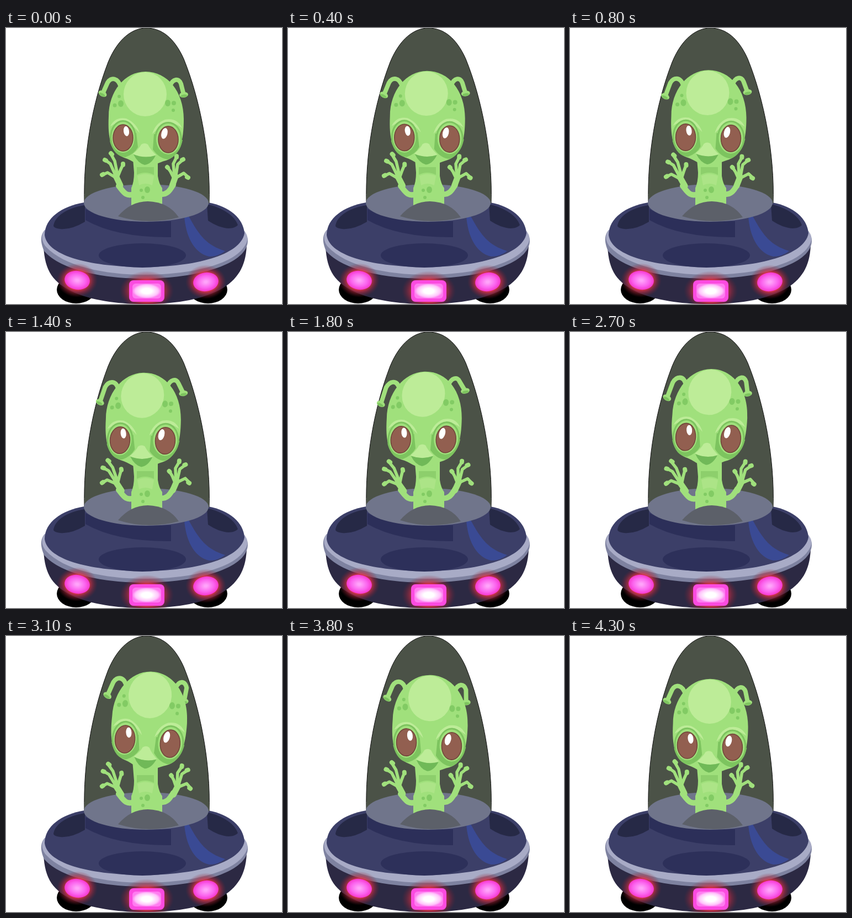
These frames come from a looping animation (500 by 500 pixels, 4.4 s). An HTML page:

```html
<!DOCTYPE html>
<html lang="en">
<head>
<meta charset="utf-8">
<title>Alien in a saucer</title>
<style>
  html, body { margin: 0; width: 100%; height: 100%; overflow: hidden; background: #fff; }
  svg { display: block; width: 100vw; height: 100vh; }
  .skin { fill: #a0e07c; }
  .light { fill: #bdec98; }
  .shade { fill: #7dc45f; }
  .spot { fill: #82cb64; }
  .limb { fill: none; stroke: #a0e07c; stroke-linecap: round; stroke-linejoin: round; }
</style>
</head>
<body>
<svg viewBox="0 0 500 500">
  <defs>
    <radialGradient id="glow">
      <stop offset=".5" stop-color="#ff3a50" stop-opacity=".95"/>
      <stop offset=".7" stop-color="#c02c40" stop-opacity=".6"/>
      <stop offset="1" stop-color="#7a2030" stop-opacity="0"/>
    </radialGradient>
    <radialGradient id="lamp">
      <stop offset=".1" stop-color="#ffa4fa"/>
      <stop offset=".65" stop-color="#fb63ee"/>
      <stop offset="1" stop-color="#f639cf"/>
    </radialGradient>
    <radialGradient id="beam">
      <stop offset=".35" stop-color="#fff"/>
      <stop offset=".8" stop-color="#ffc4fb"/>
      <stop offset="1" stop-color="#ff7cf0"/>
    </radialGradient>
  </defs>

  <!-- dome and seat -->
  <path fill="#4b5247" stroke="#111" d="M142 318C140 230 155 140 185 62C203 18 230 0 254 0C282 0 305 18 322 56C352 130 371 230 368 318Z"/>

  <!-- hull -->
  <ellipse cx="127" cy="474" rx="35" ry="25" fill="#000"/>
  <ellipse cx="366" cy="474" rx="35" ry="25" fill="#000"/>
  <path fill="#2c2943" d="M68 395C70 440 85 462 125 480C165 496 210 500 250 500C300 500 350 494 388 474C420 456 434 432 436 395Z"/>
  <path fill="#7e82a0" d="M70 366C60 378 64 392 69 404C100 440 180 454 250 454C330 454 415 435 434 400C441 388 438 376 432 368Z"/>
  <path fill="#a8abc6" d="M70 366C62 378 66 388 72 396C105 432 180 447 250 447C330 447 412 430 433 394C440 384 438 376 432 368Z"/>
  <path fill="#3c3f68" d="M142 316C100 323 70 345 70 375C75 415 160 433 250 433C340 433 425 412 432 372C430 345 405 323 366 316Z"/>
  <path fill="#262946" d="M86 359C88 341 110 326 143 321V351Q118 366 98 364Q88 363 86 359ZM364 319C394 326 415 341 420 357C408 369 384 361 366 349Z"/>
  <path fill="#2c2f59" d="M144 328Q190 352 299 350V379Q200 380 144 348Z"/>
  <ellipse cx="247" cy="412" rx="79" ry="22" fill="#2d305a"/>
  <path fill="#3a4a94" d="M323 340C325 375 340 408 368 414Q385 414 397 404C364 394 350 376 331 341Z"/>
  <path fill="#4b5247" d="M142 300H368V318H142Z"/>
  <ellipse cx="254" cy="317" rx="113" ry="34" fill="#70758b"/>

  <g id="lights">
    <ellipse cx="129" cy="457" rx="37" ry="31" fill="url(#glow)"/>
    <ellipse cx="129" cy="457" rx="23" ry="17" fill="url(#lamp)" transform="rotate(8 129 457)"/>
    <ellipse cx="362" cy="460" rx="37" ry="31" fill="url(#glow)"/>
    <ellipse cx="362" cy="460" rx="23" ry="17" fill="url(#lamp)" transform="rotate(-8 362 460)"/>
    <ellipse cx="255" cy="476" rx="49" ry="36" fill="url(#glow)"/>
    <rect x="223" y="457" width="64" height="39" rx="8" fill="#fb4be0"/>
    <rect x="229" y="463" width="52" height="27" rx="6" fill="url(#beam)"/>
  </g>

  <!-- alien -->
  <path class="limb" stroke-width="10" d="M232 301C217 306 213 297 204 286M278 301C292 303 297 294 303 284"/>
  <path class="skin" d="M229 225H275V268Q277 282 283 290V322H227V290Q232 279 232 262Z"/>
  <path fill="#8dcf6c" d="M237 252H268V266Q252 258 237 266Z"/>
  <path class="light" d="M238 268Q252 261 268 268L265 285Q252 279 241 285Z" opacity=".4"/>
  <g class="spot">
    <ellipse cx="256" cy="293" rx="5" ry="6"/><circle cx="245" cy="294" r="3"/><circle cx="248" cy="307" r="3"/>
  </g>
  <path fill="#5c6069" d="M203 341Q226 314 257 314Q294 315 313 343Q257 358 203 341Z"/>

  <g id="leftHand">
    <path class="limb" stroke-width="11" d="M207 285L199 268"/>
    <path class="limb" stroke-width="5.5" d="M202 266L197 241L191 230M198 266L189 246L181 240M197 270L184 262L175 266M203 268L207 258L212 247"/>
    <path class="limb" stroke-width="8" d="M190 227L192 229M179 239L181 240M174 266L176 265M212 246L212 248"/>
  </g>
  <g id="rightHand">
    <path class="limb" stroke-width="11" d="M301 286L307 269"/>
    <path class="limb" stroke-width="5.5" d="M305 266L303 246L309 234M308 266L311 247L320 239M310 270L322 263L330 270M303 270L298 260L293 253"/>
    <path class="limb" stroke-width="8" d="M309 232L309 234M319 239L321 238M328 270L330 271M292 252L293 253"/>
  </g>

  <g id="head">
    <path class="limb" id="leftStalk" stroke-width="8"/>
    <path class="limb" id="rightStalk" stroke-width="8"/>
    <g id="leftCup"><ellipse class="skin" rx="8" ry="5" transform="rotate(28)"/><ellipse class="shade" cy="2" rx="6" ry="2.5" transform="rotate(28)"/></g>
    <g id="rightCup"><ellipse class="skin" rx="8" ry="5" transform="rotate(-8)"/><ellipse class="shade" cy="2" rx="6" ry="2.5" transform="rotate(-8)"/></g>
    <path class="skin" d="M253 79C215 79 186 115 186 160C184 200 190 226 214 235C230 240 240 251 252 251C266 251 275 244 290 240C315 232 322 205 322 165C322 115 292 79 253 79Z"/>
    <ellipse class="light" cx="252" cy="120" rx="39" ry="40"/>
    <g class="spot">
      <ellipse cx="208" cy="137" rx="5" ry="6"/><circle cx="197" cy="140" r="3.5"/><circle cx="205" cy="124" r="3"/>
      <ellipse cx="293" cy="136" rx="5" ry="6"/><circle cx="304" cy="136" r="4"/><circle cx="303" cy="149" r="3"/>
    </g>
    <path class="light" d="M189 178Q198 160 218 164Q236 172 242 190Q222 167 204 170ZM265 192Q270 173 288 166Q310 162 319 181Q300 168 285 173Z"/>
    <path class="shade" d="M188 205Q196 233 216 234Q232 229 239 216L236 190ZM268 192L266 220Q278 237 294 238Q314 230 320 203Z"/>
    <g class="shade"><ellipse cx="212" cy="198" rx="24" ry="31"/><ellipse cx="294" cy="201" rx="25" ry="31"/></g>
    <g class="skin"><ellipse cx="212" cy="198" rx="21" ry="28"/><ellipse cx="294" cy="201" rx="22" ry="28"/></g>
    <g fill="#925f50" stroke="#704439" stroke-width="1.5"><ellipse cx="212" cy="199" rx="18" ry="24"/><ellipse cx="294" cy="202" rx="18" ry="24"/></g>
    <g fill="#fff">
      <ellipse cx="218" cy="187" rx="5" ry="9" transform="rotate(-8 218 187)"/>
      <ellipse cx="287" cy="191" rx="5.5" ry="10" transform="rotate(14 287 191)"/>
    </g>
    <path class="light" d="M230 228Q241 219 245 211Q251 207 257 211Q262 221 272 230Q251 238 230 228Z"/>
    <path fill="#70b958" d="M231 229Q251 237 271 231Q263 247 251 248Q239 245 231 229Z"/>
  </g>
</svg>
<script>
const LOOP = 4400, STEP = 100;
const part = id => document.getElementById(id);

// time, shift x, shift y, tilt, lean, stretch, left hand, right hand, left stalk, right stalk
const poses = [
  [0, 0, 0, 0, 0, 1, 0, 0, 0, 0],
  [800, -2.5, -1.5, -.012, 0, 1.01, -4, 2, 6, 2],
  [1400, -5.5, -4, -.025, -.01, 1.01, -8, 4, 11, 4],
  [2200, -10, -7.5, -.06, -.02, 1.015, -13, 6, 18, 7],
  [3100, 3.5, -9.5, .06, -.07, 1.04, -7, 8, 6, -8],
  [3800, 2.5, -4.5, .045, -.03, 1.03, -3, 3, 4, -4],
  [LOOP, 0, 0, 0, 0, 1, 0, 0, 0, 0]
];

function poseAt(time) {
  const next = poses.findIndex(p => p[0] > time);
  const a = poses[next - 1], b = poses[next];
  const mix = (time - a[0]) / (b[0] - a[0]);
  return a.map((v, i) => v + (b[i] - v) * mix);
}

function setStalk(side, start, tipX, tipY) {
  part(side + 'Stalk').setAttribute('d', `${start} ${tipX} ${tipY}`);
  part(side + 'Cup').setAttribute('transform', `translate(${tipX} ${tipY})`);
}

function draw(now) {
  const time = Math.floor(now % LOOP / STEP) * STEP;
  const [, x, y, tilt, lean, stretch, left, right, drop, curl] = poseAt(time);

  // shear around the point between the eyes
  const cx = 253, cy = 200;
  part('head').setAttribute('transform',
    `translate(${cx + x} ${cy + y}) matrix(1 ${tilt} ${lean} ${stretch} 0 0) translate(${-cx} ${-cy})`);
  part('leftHand').setAttribute('transform',
    `translate(${-left * .23} ${-left * .3}) rotate(${left} 208 282)`);
  part('rightHand').setAttribute('transform',
    `translate(${right * .3} 0) rotate(${right} 292 286)`);
  setStalk('left', `M208 107C203 90 190 ${88 + drop * .4} 184 ${99 + drop * .4}L`, 175, 119 + drop);
  setStalk('right', `M297 105C302 92 313 90 317 ${101 - curl * .3}L`, 322 + curl, 121 - curl * .8);
  requestAnimationFrame(draw);
}
draw(0);
</script>
</body>
</html>
```
